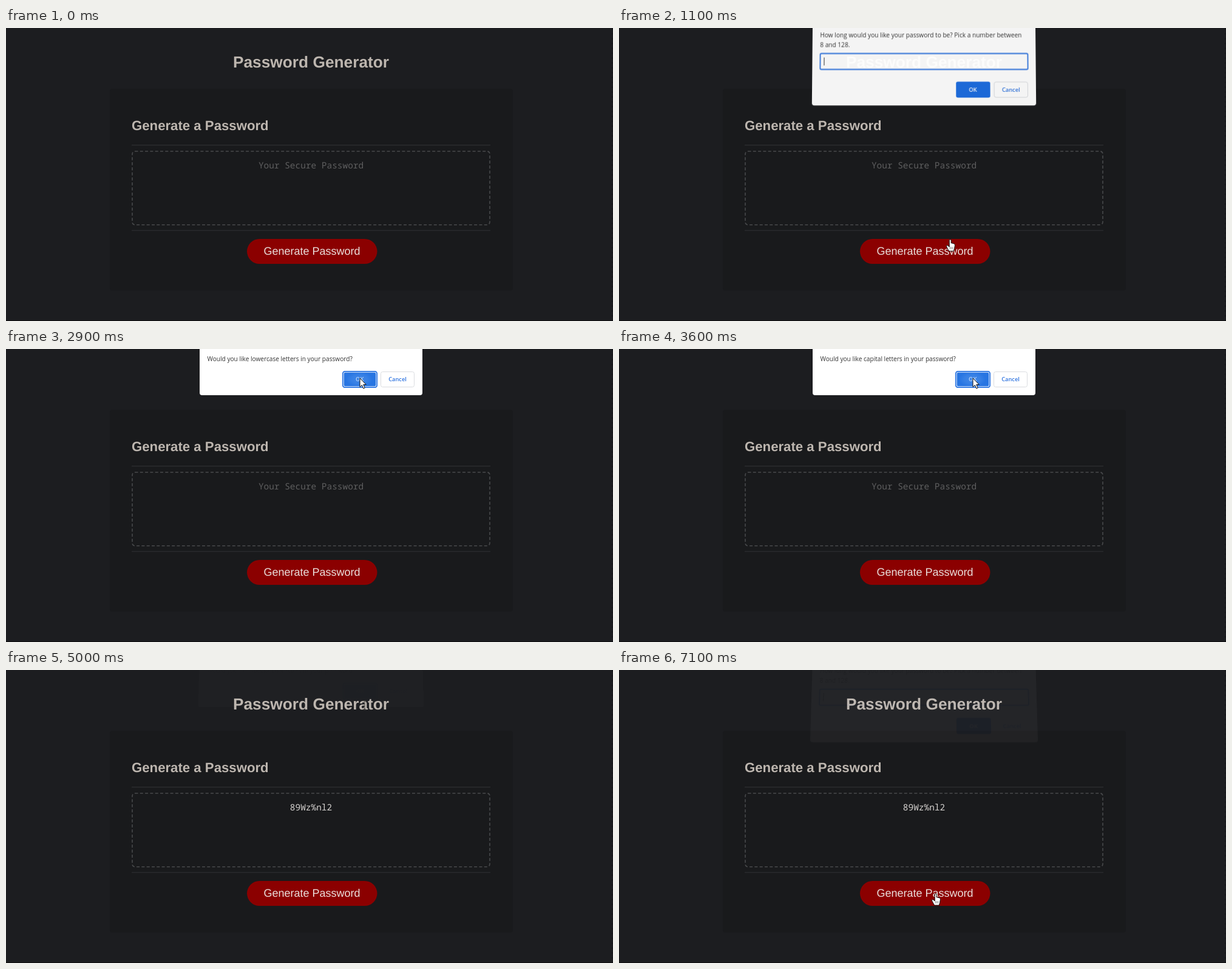
Recreate the animation shown at these times as an HTML page. Size 1000 by 482 pixels, loop 7200 ms.

```html
<!DOCTYPE html>
<html lang="en">
<head>
<meta charset="utf-8">
<title>Password Generator</title>
<style>
  html, body { margin: 0; width: 100%; height: 100%; overflow: hidden; background: #1c1d20; }
  svg { position: absolute; left: 0; top: 0; width: 1000px; height: 482px; }
  .page { font-family: "Liberation Sans", Arial, sans-serif; text-rendering: geometricPrecision; }
  .mono { font: 14.45px "Noto Sans Mono", monospace; }
  .head { font-weight: bold; fill: #bdb6af; }
  .mid { text-anchor: middle; }
  #dialog { font: 10.14px "Open Sans", sans-serif; fill: #333; transform-origin: 502px 0; }
  .label { font-size: 9.3px; font-weight: 600; text-anchor: middle; }
</style>
</head>
<body>
<svg class="page" viewBox="0 0 1000 482">
  <rect width="1000" height="482" fill="#1c1d20"/>
  <path d="M0 481.5H1000" stroke="#0e0e10"/>
  <path d="M998.5 0V482" stroke="#121316" stroke-dasharray="3 5"/>
  <rect x="171" y="100" width="664" height="332" rx="4" fill="#191a1c"/>
  <text class="head mid" x="502.5" y="64.5" font-size="26.3">Password Generator</text>
  <text class="head" x="207" y="167.5" font-size="22.2">Generate a Password</text>
  <path d="M207 192.7H798M207 333.2H798" stroke="#2d2e31" stroke-width="1.3"/>
  <rect x="208" y="202.8" width="589" height="121" rx="4.5" fill="none"
        stroke="#48494b" stroke-width="1.6" stroke-dasharray="5 3.3"/>
  <text id="field" class="mono mid" x="502.5" y="230.5"></text>
  <rect x="397" y="347" width="214.5" height="41" rx="20.5" fill="#8b0000"/>
  <text class="mid" x="504" y="373.4" font-size="18" fill="#eadfdc">Generate Password</text>
</svg>

<svg id="dialog" viewBox="0 0 1000 482">
  <defs>
    <radialGradient id="glow">
      <stop offset="0" stop-color="#5b9aec" stop-opacity=".5"/>
      <stop offset=".6" stop-color="#5b9aec" stop-opacity=".3"/>
      <stop offset="1" stop-color="#5b9aec" stop-opacity="0"/>
    </radialGradient>
  </defs>
  <rect id="sheet" x="319" y="-40" width="367" rx="4" fill="#fff"/>
  <text id="line1" x="331.5" y="19.6"></text>
  <g id="entry">
    <text x="331.5" y="35.8">8 and 128.</text>
    <rect x="332" y="46.5" width="341" height="26" rx="2" fill="#fff" stroke="#2f74e0" stroke-width="1.8"/>
    <text id="typed" x="338" y="63">8</text>
    <path id="caret" stroke="#333" d="M338.5 53V66"/>
  </g>
  <g id="buttons">
    <rect id="ok" x="555" width="56" height="26" rx="3"/>
    <text class="label" x="582.7" y="16.4" fill="#fff">OK</text>
    <ellipse id="hover" cx="582" cy="13" rx="22" ry="12.5" fill="url(#glow)"/>
    <g id="ring" fill="none">
      <rect x="554.7" y="-.3" width="56.6" height="26.6" rx="3.5" stroke="#2b75e2" stroke-width="1.5"/>
      <rect x="556.2" y="1.2" width="53.6" height="23.6" rx="2.5" stroke="#dce9fb" stroke-width="1.1"/>
    </g>
    <rect x="617.5" y=".5" width="55" height="25" rx="3" fill="none" stroke="#dadce0"/>
    <text class="label" x="645" y="16.4" fill="#2f74e0">Cancel</text>
  </g>
</svg>

<svg viewBox="0 0 1000 482">
  <g id="cursor">
    <path id="arrow" d="M0 0V14.5L3.4 11.4L5.8 17L8.2 16L5.8 10.5H10.2Z" fill="#fff" stroke="#111"/>
    <g id="hand">
      <path d="M-1.8 10V1.2Q-1.8 0 -.3 0T1.2 1.2V6L2.6 5.8L4 6.5L5.3 6.5L6.6 7.6Q7.6 8 7.4 10L6.6 14.5L5.4 19H-2.4L-5.6 13.2Q-7.4 10.6 -6 9.6Q-4.6 9 -1.8 12Z" fill="#fff" stroke="#111"/>
      <path d="M1.6 12V16M3.8 12V16M-.6 12V16" stroke="#555" stroke-width=".7"/>
    </g>
    <path id="beam" d="M-2.5 -7H2.5M0 -7V7M-2.5 7H2.5" fill="none" stroke="#55534f" stroke-width="1.1"/>
  </g>
</svg>

<script>
const LOOP = 7200, STEP = 100, FADE = 200;
const el = id => document.getElementById(id);
const show = (id, on) => el(id).style.display = on ? "" : "none";
const clamp = v => Math.max(0, Math.min(1, v));
const ask = what => `Would you like ${what} in your password?`;
const lengthText = "How long would you like your password to be? Pick a number between";

// opening time, closing time, message
const dialogs = [
  [960, 2360, lengthText],
  [2560, 2990, ask("lowercase letters")],
  [3190, 3620, ask("capital letters")],
  [3820, 4200, ask("numbers")],
  [4380, 4801, ask("special characters")],
  [7097, 9000, lengthText]
];

// time, x, y of the pointer's hot spot
const path = [
  [100, 990, 470], [700, 546, 348], [1700, 546, 348], [2200, 579, 101],
  [2600, 579, 101], [2900, 583, 48], [4800, 583, 48], [5000, 591, 58],
  [5500, 591, 58], [6300, 522, 368]
];

function pointer(t) {
  const i = path.findIndex(p => p[0] > t);
  if (i < 0) return path[path.length - 1].slice(1);
  const [a, b] = [path[i - 1], path[i]];
  let k = (t - a[0]) / (b[0] - a[0]);
  k = k * k * (3 - 2 * k);
  return [a[1] + (b[1] - a[1]) * k, a[2] + (b[2] - a[2]) * k];
}

function drawDialog(t, x, y) {
  const d = dialogs.find(([from, to]) => t >= from && t < to + FADE);
  show("dialog", d);
  if (!d) return false;
  const [from, to, text] = d;
  const away = t < to ? 1 - clamp((t - from) / FADE) : clamp((t - to) / FADE);
  const prompt = text === lengthText;
  const top = prompt ? 92.5 : 37;
  const typed = prompt && t >= 1500 && t < 7000;
  const hover = x > 555 && x < 611 && y > top && y < top + 26;
  const style = el("dialog").style;
  style.opacity = 1 - away ** 2.5;
  style.transform = `translateY(${-15.4 * away}px) perspective(400px) rotateX(${3.8 * away}deg)`;
  el("sheet").setAttribute("height", prompt ? 171.3 : 116);
  el("line1").textContent = text;
  el("buttons").setAttribute("transform", `translate(0 ${top})`);
  el("ok").setAttribute("fill", hover ? "#2775e2" : "#1b6ce1");
  show("entry", prompt);
  show("typed", typed);
  show("caret", t < 2000 || t > 7000);
  el("caret").setAttribute("transform", `translate(${typed ? 6.5 : 0} 0)`);
  show("ring", !prompt);
  show("hover", hover);
  return away < .9 && x > 319 && x < 686 && y < (prompt ? 131 : 76);
}

function drawCursor(t, x, y, onDialog) {
  const button = x > 397 && x < 611 && y > 347 && y < 388;
  const title = x > 374 && x < 631 && y > 42 && y < 70;
  const box = x > 208 && x < 797 && y > 203 && y < 324;
  const kind = onDialog ? "arrow" : button ? "hand" : title || box ? "beam" : "arrow";
  for (const id of ["arrow", "hand", "beam"]) show(id, id === kind);
  show("cursor", t >= 100);
  el("cursor").setAttribute("transform", `translate(${x} ${y})`);
}

function draw(t) {
  const [x, y] = t < 100 ? path[0].slice(1) : pointer(t);
  const done = t >= 4900;
  el("field").textContent = done ? "89Wz%nl2" : "Your Secure Password";
  el("field").setAttribute("fill", done ? "#d6d3d0" : "#5e5e5f");
  drawCursor(t, x, y, drawDialog(t, x, y));
}

const start = performance.now();
function frame() {
  const t = (performance.now() - start) % LOOP;
  draw(Math.floor(t / STEP) * STEP);
  requestAnimationFrame(frame);
}
frame();
</script>
</body>
</html>
```
